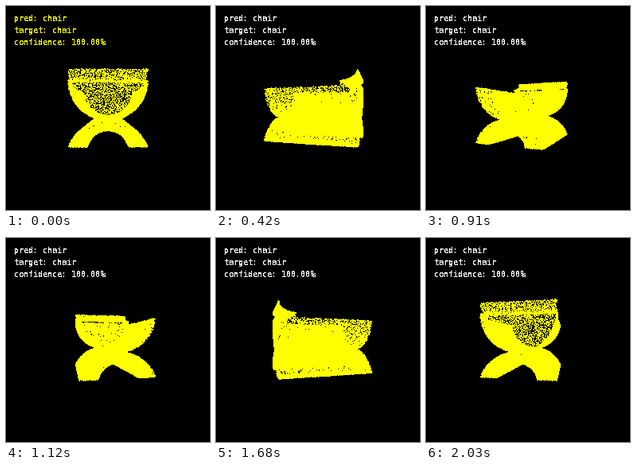
These frames come from a looping animation (256x256 px, 2.1 s). A matplotlib script:

```python
import numpy as np
import matplotlib.pyplot as plt
from matplotlib.animation import FuncAnimation

SIZE, FRAMES, STEP_MS = 256, 30, 70
FOCAL = SIZE / 2 / np.tan(np.radians(30))
DIST, DOT = 3.0, 1.05
DENSITY = 1650       # dots per square unit

# Chair: half width, half height, half depth
W, H, D = 0.515, 0.506, 0.705
JOINT = -0.16        # height where seat shell and leg arch touch
ARM = 0.30           # top of the arm rests
HUB = JOINT + W      # centre of the seat shell's circle
FOOT, CROWN = 0.275, -0.295   # inner arch: half width and top
REST_H, REST_D = 0.138, 0.23  # back rest: rise and depth

rng = np.random.default_rng(4)


def spread(w, h, tries=10):
    """Evenly spaced random points in a w by h sheet (best candidate)."""
    n = int(w * h * DENSITY)
    px, py = np.full(n, -9.0), np.full(n, -9.0)
    for i in range(n):
        cx, cy = rng.random(tries) * w, rng.random(tries) * h
        gap = (cx[:, None] - px[:i + 1]) ** 2 + (cy[:, None] - py[:i + 1]) ** 2
        best = gap.min(axis=1).argmax()
        px[i], py[i] = cx[best], cy[best]
    return px, py


def arch(half, top):
    """Radius and half angle of the arc from the floor up to top."""
    rise = top + H
    r = (half * half + rise * rise) / (2 * rise)
    return r, np.arcsin(half / r)


def arch_height(x, half, top):
    r, _ = arch(half, top)
    y = top - r + np.sqrt(r * r - x * x)
    return np.where(np.abs(x) < half, y, -H)


def arch_sheet(half, top):
    r, a = arch(half, top)
    u, v = spread(2 * r * a, 2 * D)
    x = r * np.sin(u / r - a)
    return x, arch_height(x, half, top), v - D


def seat_shell():
    lift = np.arcsin((HUB - ARM) / W)
    u, v = spread(W * (np.pi - 2 * lift), 2 * D)
    a = lift + u / W
    return W * np.cos(a), HUB - W * np.sin(a), v - D


def back_panel():
    u, v = spread(2 * W, W)
    x, y = u - W, v - W
    keep = np.hypot(x, y) < W
    return x[keep], HUB + y[keep], np.full(keep.sum(), D)


def back_rest():
    u, v = spread(2 * W, 0.29)
    a = v / 0.29 * np.pi / 2
    return u - W, H - REST_H * np.cos(a), D - REST_D * (1 - np.sin(a))


def rest_side(x):
    u, v = spread(REST_D, H - REST_H - ARM)
    return np.full_like(u, x), ARM + v, D - u


def leg_cap(z):
    u, v = spread(2 * W, H + JOINT)
    x, y = u - W, v - H
    keep = (y < arch_height(x, W, JOINT)) & (y > arch_height(x, FOOT, CROWN))
    return x[keep], y[keep], np.full(keep.sum(), z)


def sole(side):
    u, v = spread(W - FOOT, 2 * D)
    return side * (FOOT + u), np.full_like(u, -H), v - D


PARTS = [seat_shell(), back_panel(), back_rest(),
         rest_side(-W), rest_side(W),
         arch_sheet(W, JOINT), arch_sheet(FOOT, CROWN),
         leg_cap(-D), leg_cap(D), sole(-1), sole(1)]
X, Y, Z = np.hstack(PARTS)


def render(angle):
    c, s = np.cos(angle), np.sin(angle)
    scale = FOCAL / (DIST + X * s - Z * c)
    px = SIZE / 2 + scale * (X * c + Z * s)
    py = SIZE / 2 - scale * Y
    img = np.zeros((SIZE, SIZE, 3), np.uint8)
    col, row = np.floor(px).astype(int), np.floor(py).astype(int)
    for dx in (-1, 0, 1):
        for dy in (-1, 0, 1):
            cx, cy = col + dx, row + dy
            hit = np.hypot(cx + 0.5 - px, cy + 0.5 - py) < DOT
            img[cy[hit], cx[hit], :2] = 255
    return img


plt.rcParams["text.hinting_factor"] = 1
fig = plt.figure(figsize=(SIZE / 100, SIZE / 100), dpi=100, facecolor="black")
ax = fig.add_axes([0, 0, 1, 1])
ax.axis("off")
view = ax.imshow(render(0), extent=(0, SIZE, SIZE, 0),
                 interpolation="nearest", aspect="auto")

LINES = ["pred: chair", "target: chair", "confidence: 100.00%"]
labels = [ax.text(10, 19 + 15 * k, line, family="DejaVu Sans Mono",
                  weight="bold", size=7.2, va="baseline", antialiased=False)
          for k, line in enumerate(LINES)]


def update(i):
    view.set_data(render(2 * np.pi * i / FRAMES))
    for label in labels:
        label.set_color("#ffff00" if i == 0 else "white")
    return [view, *labels]


anim = FuncAnimation(fig, update, frames=FRAMES, interval=STEP_MS,
                     repeat=True, repeat_delay=0)
plt.show()
```
